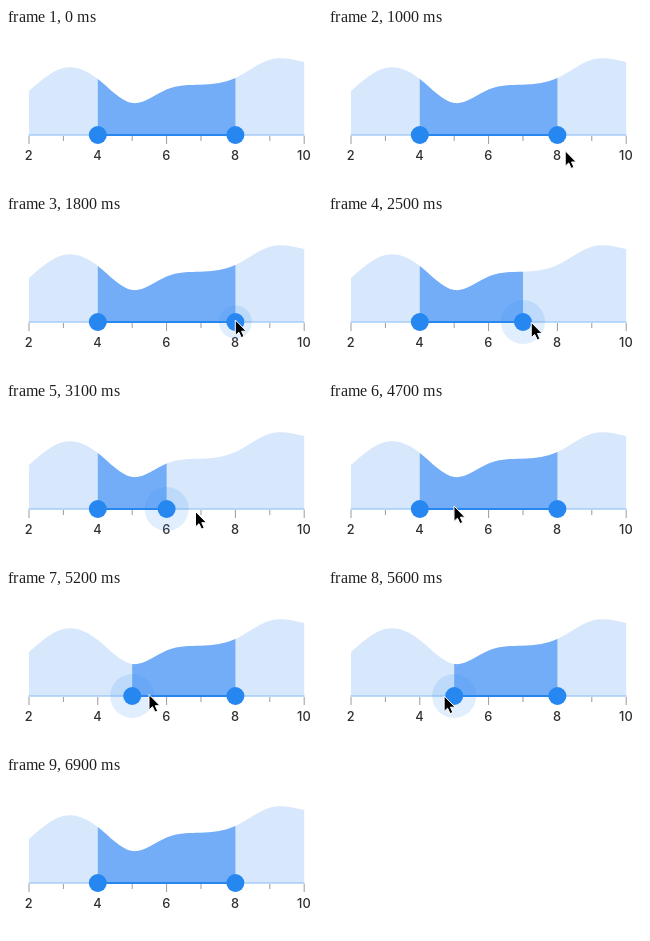
Write an HTML page that moves like this. It is 316x159 px and loops after 7200 ms.

```html
<!DOCTYPE html>
<html lang="en">
<head>
<meta charset="utf-8">
<title>Range selector</title>
<style>
  html, body { margin: 0; width: 100%; height: 100%; overflow: hidden; background: #fff; }
  svg { display: block; width: 316px; height: 159px; }
  text { font: 500 12.8px Inter, Roboto, sans-serif; letter-spacing: .2px; fill: #303030; text-anchor: middle; }
  .tick { stroke: #9b9b9b; stroke-width: 1; }
  .thumb, #halo { fill: #2787f0; }
</style>
</head>
<body>
<svg viewBox="0 0 316 159">
  <defs>
    <path id="area"/>
    <clipPath id="range"><rect id="window" y="0" height="107"/></clipPath>
  </defs>
  <use href="#area" fill="#d7e7fc"/>
  <use href="#area" fill="#73adf8" clip-path="url(#range)"/>
  <g id="scale"></g>
  <path d="M22.5 107H298.5" stroke="#a6ccf9" stroke-width="1.6"/>
  <path id="track" stroke="#2787f0" stroke-width="2"/>
  <circle id="halo" cy="107"/>
  <circle id="low" class="thumb" cy="107" r="9"/>
  <circle id="high" class="thumb" cy="107" r="9"/>
  <path id="cursor" d="M0 0V15.4L3.5 12.2 6 17.6 8.7 16.4 6.3 11.2H11Z" fill="#000" stroke="#fff"/>
</svg>
<script>
  const LOOP = 7200, STEP = 100, LAG = 100;
  const LEFT = 23, UNIT = 34.4;
  const heights = [63, 40, 51, 75, 61.5, 56.7, 50, 31.7, 34];

  const drags = {
    low: { rest: 4, press: 4700, release: 5700 },
    high: { rest: 8, press: 1700, release: 3700 }
  };

  // Pointer moves: [start ms, end ms, x, y]
  const pointerStart = [240, 129];
  const moves = [
    [900, 1200, 229.3, 105],
    [1800, 1900, 209, 107],
    [2400, 2800, 172, 109],
    [2900, 3300, 207, 110],
    [3400, 3700, 229, 110],
    [3900, 4500, 80, 113],
    [4600, 4700, 126, 104],
    [5100, 5300, 160, 107],
    [5300, 5700, 108, 107]
  ];

  const el = id => document.getElementById(id);
  const xOf = value => LEFT + (value - 2) * UNIT;
  const valueAt = x => Math.round((x - LEFT) / UNIT + 2);
  const clamp = p => Math.min(1, Math.max(0, p));
  const smooth = p => p * p * (3 - 2 * p);

  function set(id, attrs) {
    for (const name in attrs) el(id).setAttribute(name, attrs[name]);
  }

  // Natural cubic spline: relax the slopes, then emit one Bézier per interval.
  function splinePath(ys) {
    const last = ys.length - 1;
    const slopes = ys.map(() => 0);
    for (let pass = 0; pass < 30; pass++) {
      for (let i = 0; i <= last; i++) {
        const a = Math.max(i - 1, 0), b = Math.min(i + 1, last);
        const sides = (i > 0 ? slopes[a] : 0) + (i < last ? slopes[b] : 0);
        slopes[i] = (3 * (ys[b] - ys[a]) - sides) / (2 * (b - a));
      }
    }
    let d = `M${LEFT} 107V${ys[0]}`;
    for (let i = 0; i < last; i++) {
      const x = xOf(i + 2), third = UNIT / 3;
      d += `C${x + third} ${ys[i] + slopes[i] / 3} ${x + 2 * third} ${ys[i + 1] - slopes[i + 1] / 3} ${x + UNIT} ${ys[i + 1]}`;
    }
    return d + "V107Z";
  }

  function pointer(t) {
    let [x, y] = pointerStart;
    for (const [start, end, toX, toY] of moves) {
      const p = smooth(clamp((t - start) / (end - start)));
      x += (toX - x) * p;
      y += (toY - y) * p;
    }
    return [x, y];
  }

  function thumbX(drag, t) {
    const held = t > drag.press && t < drag.release;
    return xOf(held ? valueAt(pointer(t - LAG)[0]) : drag.rest);
  }

  function halo(drag, t) {
    const grow = clamp((t - drag.press) / 200);
    const fade = clamp((t - drag.release - 100) / 200);
    return { r: 22 * grow * (2 - grow), opacity: .14 * (1 - fade * fade) };
  }

  function draw(now) {
    const t = Math.floor((now % LOOP) / STEP) * STEP;
    const low = thumbX(drags.low, t), high = thumbX(drags.high, t);
    const lowActive = t >= drags.low.press;
    set("window", { x: low, width: high - low });
    set("track", { d: `M${low} 107H${high}` });
    set("low", { cx: low });
    set("high", { cx: high });
    set("halo", { cx: lowActive ? low : high, ...halo(lowActive ? drags.low : drags.high, t) });
    set("cursor", {
      visibility: t >= 800 && t <= 6000 ? "visible" : "hidden",
      transform: `translate(${pointer(t)})`
    });
  }

  el("area").setAttribute("d", splinePath(heights));
  let scale = "";
  heights.forEach((_, i) => {
    const x = xOf(i + 2), major = i % 2 === 0;
    scale += `<path class="tick" d="M${x} 108V${major ? 116 : 113}"/>`;
    if (major) scale += `<text x="${x - .3}" y="131.5">${i + 2}</text>`;
  });
  el("scale").innerHTML = scale;

  function frame() {
    draw(performance.now());
    requestAnimationFrame(frame);
  }
  frame();
</script>
</body>
</html>
```
